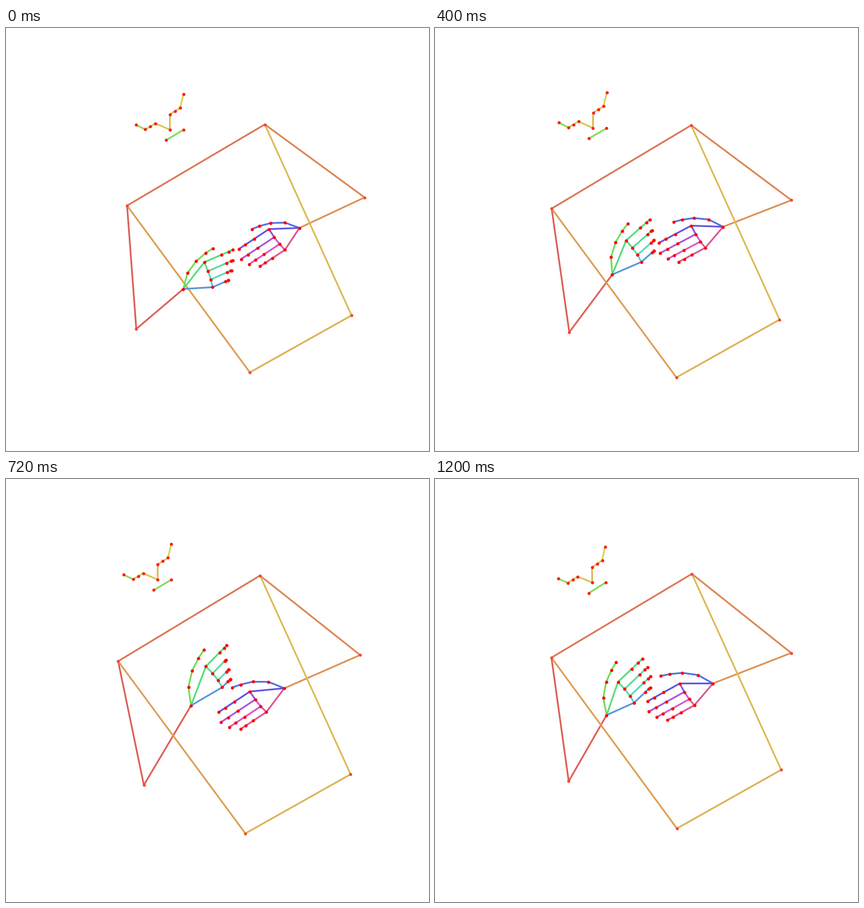
A matplotlib script that plays this animation: 748x748 px, repeating every 1280 ms.

```python
import colorsys

import matplotlib.pyplot as plt
import numpy as np
from matplotlib.animation import FuncAnimation
from matplotlib.collections import LineCollection

SIZE, DPI = 748, 100
FRAMES, INTERVAL = 16, 80
PX = 72 / DPI
TIMES = [0, 2, 5, 7, 11, 13, 15]


def ease(*keys):
    """Smooth Hermite curve through the keys, as a function of the frame."""
    slopes = np.gradient(np.array(keys), TIMES)

    def at(t):
        i = max(np.searchsorted(TIMES, t) - 1, 0)
        h = TIMES[i + 1] - TIMES[i]
        u = (t - TIMES[i]) / h
        s = u * u * (3 - 2 * u)
        bend = h * u * (1 - u) * ((1 - u) * slopes[i] - u * slopes[i + 1])
        return keys[i] + (keys[i + 1] - keys[i]) * s + bend
    return at


# Two slow movements carry the whole body. Points are complex: x + yj.
sway = ease(.05, 0, .53, .9, 1, .86, .58)
bob = ease(.4, .25, .1, 0, .8, 1, .95)

# Rest position, shift by sway, shift by bob
NOSE = (291.3 + 177.3j, -22 - 1.5j, 7.5j)
BODY = [
    (215.2 + 316j, -16 + 8j, .5 - 4.5j),      # shoulders
    (457.8 + 173j, -8.5, 2 - 5j),
    (231 + 534j, 13.5 + 9j, -2 - 4.5j),       # elbows
    (635 + 298.3j, -8 + 12j, 3j),
    (431.5 + 609j, -8 + 18j, 1.5 - 1j),       # hips
    (610.2 + 509j, -1.5 + 14j, 3.5 - 2.5j),
]
# (joint, joint, hue); joints 6 and 7 are the wrists
BODY_EDGES = [(0, 2, .012), (2, 6, .014), (0, 1, .04), (1, 3, .06), (3, 7, .075),
              (0, 4, .09), (4, 5, .113), (1, 5, .125)]

# Offsets from the nose: inner eye, outer eye and ear per side, then the mouth
EYES = [(-25.3 - 11.5j, -43.3 - 1j, -60 - 9.5j), (.7 - 27j, 19 - 38.2j, 25 - 62.5j)]
MOUTH = [-6.8 + 18.5j, 23.8 + .8j]
FACE_EDGES = [(0, 1, .135), (1, 2, .2), (2, 3, .24), (3, 4, .27),
              (0, 5, .12), (5, 6, .13), (6, 7, .14), (7, 8, .155), (9, 10, .28)]

# One hand shape serves both sides, its axis along x
THUMB_ARC = np.array([.305 - .118j, .602 - .117j, .836 - .06j, 1])
KNUCKLES = [(1, 0), (.643, .387), (.31, .72), (0, 1)]
FINGER_LENGTHS = [34.5, 38.5, 35.5, 29]
FINGER_CURLS = [.64, .97, 1.04, 1.08]
SEGMENTS = np.array([1, .59, .42])


def placed(joint, t):
    rest, by_sway, by_bob = joint
    return rest + by_sway * sway(t) + by_bob * bob(t)


def face_joints(t):
    nose, tilt = placed(NOSE, t), np.exp(-.04j * bob(t))
    offsets = [0]
    for inner, outer, ear in EYES:
        offsets += [inner, (inner + outer) / 2, outer, ear]
    return [nose + p * tilt for p in offsets + MOUTH]


def hand_shape(t, size, curl):
    """Joints around the wrist: size foreshortens, curl (degrees) folds the fingers."""
    index, pinky = 67 * size - 24.3j, 57.5 * size + 21.5j
    thumb = 88 * size**.5 - 1j * (39 + .75 * t)  # the thumb opens slowly
    joints = [0, *(thumb * THUMB_ARC)]
    direction = np.exp(1j * np.radians(4.5))
    for (a, b), length, share in zip(KNUCKLES, FINGER_LENGTHS, FINGER_CURLS):
        bend = curl * share
        folds = np.radians([max(0, bend - 50), bend, 1.18 * bend])
        bones = length * size**.25 * SEGMENTS * np.cos(folds)
        base = a * index + b * pinky
        joints += [base, *(base + direction * np.cumsum(bones))]
    return np.array(joints)


left_wrist = ease(314 + 462j, 305 + 464j, 314 + 436.5j, 328.5 + 412j,
                  319.5 + 399j, 312 + 401j, 304 + 418j)
left_angle = ease(-28, -29.5, -46, -49.5, -49.5, -50, -48)
left_size = ease(.82, .78, .9, 1.04, 1, 1, .85)
left_curl = ease(68, 64, 70, 84, 84, 73, 56)

right_wrist = ease(519.5 + 354j, 523.5 + 349j, 510 + 352j, 498.5 + 364j,
                   490 + 371j, 488 + 365j, 492 + 362j)
right_angle = ease(151, 155.5, 156.5, 152, 152, 153, 155.5)
right_size = ease(.72, .69, .76, .8, .86, .86, .8)


def left_hand(t):
    shape = hand_shape(t, left_size(t), left_curl(t))
    return left_wrist(t) + shape * np.exp(1j * np.radians(left_angle(t)))


def right_hand(t):
    shape = hand_shape(t, right_size(t), 15).conj()
    return right_wrist(t) + shape * np.exp(1j * np.radians(right_angle(t)))


def hand_edges(hues):
    """Finger chains, the line across the knuckles, and the palm sides."""
    edges = []
    for finger, hue in enumerate(hues):
        first = 4 * finger + 1
        if finger in (0, 1, 4):
            edges.append((0, first, hue))
        if finger > 1:
            edges.append((first - 4, first, (hue + hues[finger - 1]) / 2))
        edges += [(j, j + 1, hue) for j in range(first, first + 3)]
    return edges


LEFT_EDGES = hand_edges([.3, .38, .42, .45, .585])
RIGHT_EDGES = hand_edges([.635, .68, .77, .86, .92])
ALL_EDGES = [BODY_EDGES, FACE_EDGES, LEFT_EDGES, RIGHT_EDGES]


def to_xy(points):
    points = np.array(points)
    return np.stack([points.real, points.imag], axis=-1)


fig = plt.figure(figsize=(SIZE / DPI, SIZE / DPI), dpi=DPI, facecolor="white")
ax = fig.add_axes([0, 0, 1, 1])
ax.set(xlim=(.5, SIZE + .5), ylim=(SIZE + .5, .5))
ax.axis("off")

colors = [colorsys.hsv_to_rgb(hue, .62, .865) for edges in ALL_EDGES for *_, hue in edges]
limbs = LineCollection([], colors=colors, linewidths=3 * PX, capstyle="round")
ax.add_collection(limbs)


def make_dots(color, diameter):
    return ax.scatter([], [], s=(diameter * PX)**2, color=color, linewidths=0, zorder=3)


body_dots = make_dots("#f84535", 5.4)
face_dots = make_dots("#fb221c", 5.6)
hand_dots = make_dots("#ff0a0a", 5.8)


def update(frame):
    left, right = left_hand(frame), right_hand(frame)
    body, face = [placed(joint, frame) for joint in BODY], face_joints(frame)
    groups = zip([body + [left[0], right[0]], face, left, right], ALL_EDGES)
    limbs.set_segments(to_xy([(joints[a], joints[b])
                              for joints, edges in groups for a, b, _ in edges]))
    body_dots.set_offsets(to_xy(body))
    face_dots.set_offsets(to_xy(face))
    hand_dots.set_offsets(to_xy([*left, *right]))
    return [limbs, body_dots, face_dots, hand_dots]


anim = FuncAnimation(fig, update, frames=FRAMES, interval=INTERVAL, repeat=True, repeat_delay=0)
plt.show()
```
